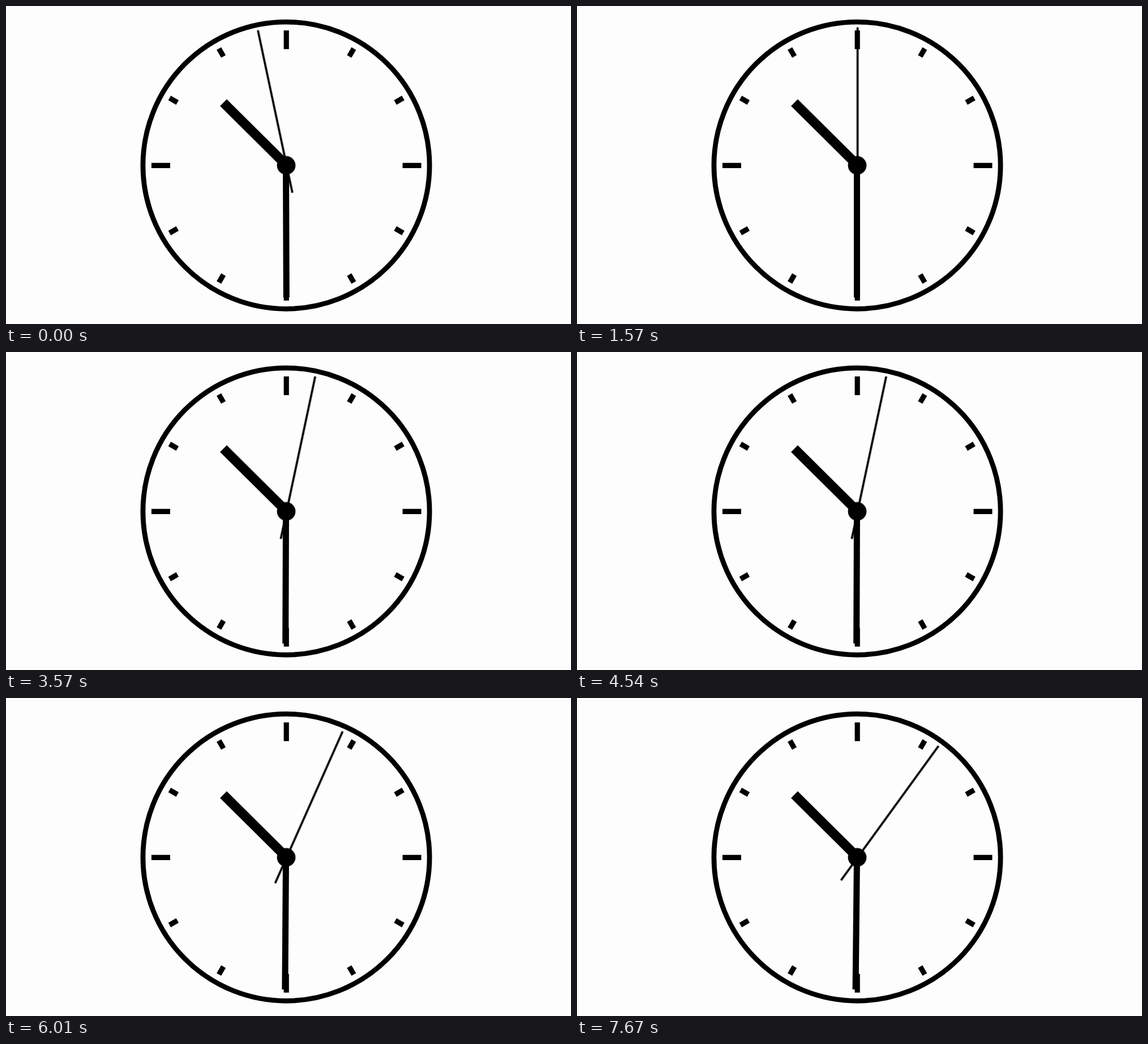
An HTML page that plays this animation: 998x561 px, repeating every 8 s.

```html
<!DOCTYPE html>
<html lang="en">
<head>
<meta charset="utf-8">
<title>Clock</title>
<style>
  html, body { margin: 0; width: 100%; height: 100%; overflow: hidden; background: #fdfdfd; }
  svg { display: block; width: 100vw; height: 100vh; }
  line { stroke: #000; }
  .hand { transform-origin: 0 0; }
</style>
</head>
<body>
<svg viewBox="0 0 998 561">
  <g transform="translate(495 281.2)">
    <circle r="253.1" fill="none" stroke="#000" stroke-width="8.8"/>
    <g id="ticks" transform="translate(.2 .2)"></g>
    <line x1=".5" y1="-.2" x2="-111" y2="-110.7" stroke-width="16.8"/>
    <line id="minute" class="hand" x1="-.5" x2="-.5" y2="233" stroke-width="11"/>
    <line id="second" class="hand" x1=".6" y1="49.6" x2=".6" y2="-243.6" stroke-width="3.7"/>
    <circle r="16.4"/>
  </g>
</svg>
<script>
  const LOOP = 8000;
  const FIRST = 570, EVERY = 995, JUMPS = 8;
  const START = -2; // seconds before the full minute

  const ticks = document.getElementById('ticks');
  for (let hour = 0; hour < 12; hour++) {
    const [mid, len] = hour % 3 ? [230.2, 16] : [221.8, 33];
    const tick = document.createElementNS('http://www.w3.org/2000/svg', 'line');
    tick.setAttribute('y1', -mid - len / 2);
    tick.setAttribute('y2', -mid + len / 2);
    tick.setAttribute('stroke-width', 9.2);
    tick.setAttribute('transform', `rotate(${hour * 30})`);
    ticks.append(tick);
  }

  // Holds each angle, then jumps ahead by one step per second
  function turn(id, step) {
    const frames = [];
    for (let i = 0; i <= JUMPS; i++) {
      frames.push({
        offset: i && (FIRST + (i - 1) * EVERY) / LOOP,
        transform: `rotate(${(START + i) * step}deg)`,
        easing: 'step-end'
      });
    }
    frames.push({ ...frames[JUMPS], offset: 1 });
    document.getElementById(id).animate(frames, { duration: LOOP, iterations: Infinity });
  }

  turn('second', 6);
  turn('minute', 0.1);
</script>
</body>
</html>
```
